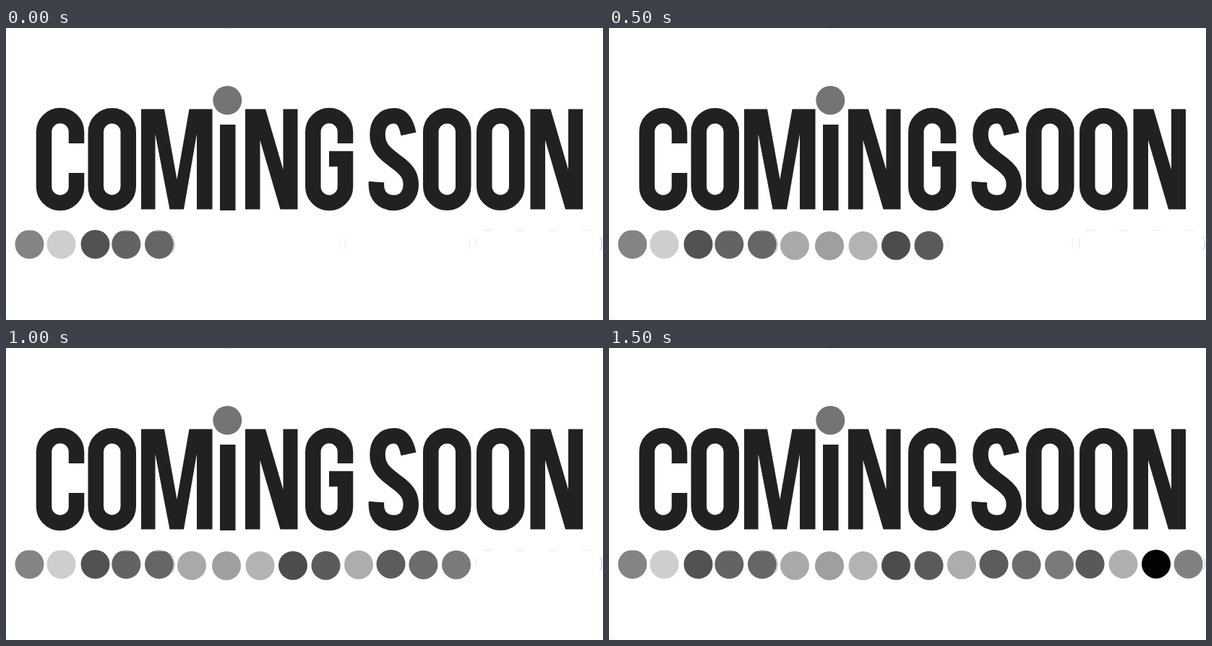
An HTML page for the animation above (2000 ms loop, 826 by 405 pixels).

```html
<!DOCTYPE html>
<html lang="en">
<head>
<meta charset="utf-8">
<title>Coming soon</title>
<style>
  html, body { margin: 0; width: 100%; height: 100%; overflow: hidden; background: #fff; }
  svg { display: block; width: 826px; height: 405px; }
  .solid { fill: #212121; }
  .line { fill: none; stroke: #212121; stroke-width: 21.5; }
  .dots circle { r: 20px; }
  .second { animation: second 2s step-end infinite; }
  .third { animation: third 2s step-end infinite; }
  .fourth { animation: fourth 2s step-end infinite; }
  @keyframes second { 0% { opacity: 0; } 25%, 100% { opacity: 1; } }
  @keyframes third { 0% { opacity: 0; } 50%, 100% { opacity: 1; } }
  @keyframes fourth { 0% { opacity: 0; } 75%, 100% { opacity: 1; } }
</style>
</head>
<body>
<svg viewBox="0 0 826 405" role="img" aria-label="Coming soon">
  <defs>
    <rect id="o" class="line" x="10.75" y="10.75" width="45" height="120.5" rx="22.5"/>
    <path id="n" class="solid" d="M0 0H28L52.5 84V0H72.5V139H48.5L20.5 43V139H0Z"/>
  </defs>

  <!-- lettering -->
  <path class="line" d="M97.5 160V144A22.5 22.5 0 0 0 52.5 144V220A22.5 22.5 0 0 0 97.5 220V201"/>
  <use href="#o" x="113.5" y="111"/>
  <path class="solid" d="M187 112.5H219L236.5 210L253.5 112.5H285.5V251.500H264V147L246 251.500H226.500L206.500 147V251.500H187Z"/>
  <path class="solid" d="M296 134H317.500V253H296Z"/>
  <circle cx="306.300" cy="100.300" r="20" fill="#747474"/>
  <use href="#n" x="331" y="112.500"/>
  <path class="line" d="M469.500 160V144A22.350 22.500 0 0 0 424.800 144V220A22.350 22.500 0 0 0 469.500 220V181.500H447"/>
  <path class="line" d="M557 147C553.500 130 548 121.800 537 121.800C522 121.800 514 133 514 148C514 167 526 175 539 185C553 195 560.300 203 560.300 217C560.300 232 551 242.500 537 242.500C521 242.500 511 232 512.500 213.500"/>
  <use href="#o" x="577" y="111"/>
  <use href="#o" x="651" y="111"/>
  <use href="#n" x="725.500" y="112.500"/>

  <!-- faint marks along the row and the edges -->
  <g fill="none" stroke="#ededed" stroke-width="1.500">
    <path d="M302 0Q308 1 314 0M0 404.500H4"/>
    <path d="M462.500 292V307M470 292Q468 300 470 307M641.500 292V307" stroke="#f3f3f3"/>
    <path d="M651 303Q649 297 652 291M660 281.500Q666 279 672 281.500M706 281.500Q711 280 717 281.500M752 281.500Q757 279 763 281.500M797 281.500Q802 279 808 281.500"/>
    <path d="M822 290Q827 299 822 308" stroke="#d6d6d6"/>
  </g>

  <g class="dots">
    <circle cx="32.500" cy="300" fill="#848484"/>
    <circle cx="76.500" cy="300" fill="#cecece"/>
    <circle cx="123.500" cy="300" fill="#525252"/>
    <circle cx="166.300" cy="300" fill="#636363"/>
    <circle cx="212" cy="300" fill="#666"/>
    <path d="M20 278H92V281H20ZM146 278H234V282H146Z" fill="#fff" opacity=".5"/>
    <path d="M226 284Q238 299 229 312" fill="none" stroke="#ccc" stroke-width="2"/>
  </g>
  <g class="dots second">
    <circle cx="257" cy="301.700" fill="#a9a9a9"/>
    <circle cx="305" cy="302" fill="#9f9f9f"/>
    <circle cx="351.500" cy="302" fill="#b3b3b3"/>
    <circle cx="397" cy="301.700" fill="#4c4c4c"/>
    <circle cx="442.500" cy="301.700" fill="#5b5b5b"/>
  </g>
  <g class="dots third">
    <circle cx="488" cy="300.700" fill="#adadad"/>
    <circle cx="532.500" cy="299.700" fill="#5c5c5c"/>
    <circle cx="577.500" cy="300.700" fill="#6c6c6c"/>
    <circle cx="623" cy="300.700" fill="#7a7a7a"/>
  </g>
  <g class="dots fourth">
    <circle cx="665.500" cy="299.700" fill="#595959"/>
    <circle cx="711.500" cy="299.700" fill="#b0b0b0"/>
    <circle cx="757" cy="299.700" fill="#030303"/>
    <circle cx="801.700" cy="299.700" fill="#808080"/>
  </g>
</svg>
</body>
</html>
```
